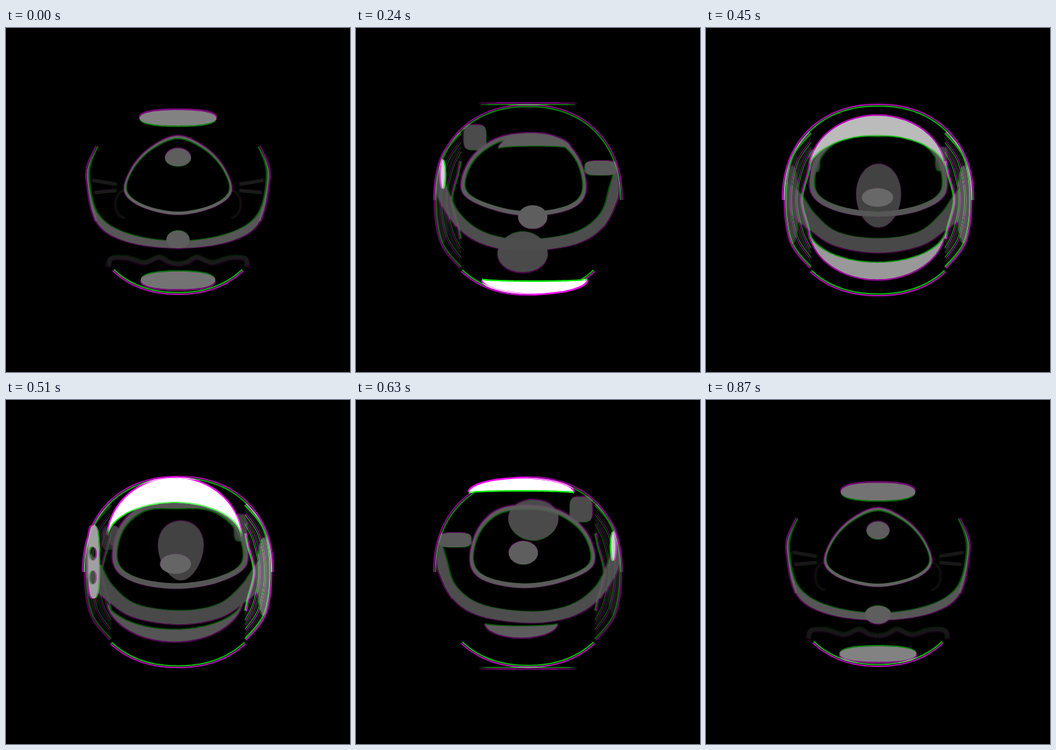
An HTML page with a canvas that plays this animation: 500 px wide and 500 px high, repeating every 900 ms.

```html
<!DOCTYPE html>
<html lang="en">
<head>
<meta charset="utf-8">
<title>Glass body</title>
<style>
html, body { margin: 0; width: 100%; height: 100%; overflow: hidden; background: #000; }
canvas { display: block; width: 500px; height: 500px; }
</style>
</head>
<body>
<canvas id="stage" width="500" height="500"></canvas>
<script>
const ctx = document.getElementById('stage').getContext('2d');
const LOOP = 900, STEP = 30, TURN = 870, MID = 250;
const { PI, sin, cos, abs, sign, max, min, floor } = Math;

// Coordinates are relative to the middle of the stage.
// Rows run down the right half: x, y facing front, x, y at the half turn, sideways swing.
const RING = [
  [0, -95, 0, -102, 4], [40, -78, 54, -99, 0], [68, -48, 92, -65, -5],
  [79, -12, 100, -12, -6], [52, 11, 64, 15, 4], [0, 22, 0, 25, 5],
];
const BOWL_OUTER = [
  [119, -79, 136, -25, 0], [134, -38, 132, 15, 0], [121, 31, 100, 44, 3],
  [77, 61, 62, 68, 2], [0, 71, 0, 78, -6],
];
const BOWL_INNER = [
  [119, -78, 134, -28, 0], [130, -38, 112, -8, 0], [117, 20, 92, 20, 3],
  [73, 49, 58, 47, 2], [0, 60, 0, 56, -6],
];
// Light pooling at the floor: time, half width, y, outer depth, inner depth, level.
const LENS = [
  [120, 100, 105, 32, 30, 0], [240, 78, 116, 22, 3, 255], [360, 99, 48, 91, 54, 255],
  [510, 102, 35, 68, 49, 85], [630, 54, 75, 22, 4, 92], [750, 28, 73, 14, -3, 92],
  [900, 17, 59, 15, -15, 95],
];
// Side reflections: time, x, y, half width, half height, level.
const UPPER_PATCH = [
  [60, -105, -85, 8, 20, 0], [120, -100, -82, 10, 26, 32], [240, -78, -92, 17, 19, 75],
  [360, -92, -65, 10, 20, 65], [510, -94, -53, 7, 15, 65], [600, -94, -45, 6, 12, 0],
];
const SIDE_PATCH = [
  [500, -102, -50, 8, 18, 40], [630, -107, -47, 24, 11, 88], [750, -115, -59, 12, 19, 75],
  [840, -120, -45, 12, 5, 0],
];

const mix = (a, b, k) => a + (b - a) * k;
const bump = (t, center, reach) => cos(PI / 2 * min(1, abs(t - center) / reach)) ** 2;
const rest = t => sin(PI * t / TURN) ** 2;
const swing = t => sin(2 * PI * t / TURN);

function sample(keys, t) {
  const i = keys.findIndex((key, n) => n && t >= keys[n - 1][0] && t < key[0]);
  if (i < 0) return null;
  const [a, b] = [keys[i - 1], keys[i]];
  return a.map((v, n) => mix(v, b[n], (t - a[0]) / (b[0] - a[0]))).slice(1);
}

// Smooth curve through the points.
function curve(pts, closed = false, path = new Path2D(), join = false) {
  const n = pts.length;
  const at = i => pts[closed ? (i + n) % n : max(0, min(n - 1, i))];
  path[join ? 'lineTo' : 'moveTo'](...at(0));
  for (let i = 0; i < (closed ? n : n - 1); i++) {
    const [p, a, b, q] = [at(i - 1), at(i), at(i + 1), at(i + 2)];
    path.bezierCurveTo(a[0] + (b[0] - p[0]) / 6, a[1] + (b[1] - p[1]) / 6,
      b[0] - (q[0] - a[0]) / 6, b[1] - (q[1] - a[1]) / 6, b[0], b[1]);
  }
  if (closed) path.closePath();
  return path;
}

function superArc(cx, cy, rx, ry, power = 2, from = 0, to = 2 * PI, taper = 0) {
  const bend = v => sign(v) * abs(v) ** (2 / power);
  return Array.from({ length: 49 }, (_, i) => {
    const a = mix(from, to, i / 48), y = bend(sin(a));
    return [cx + rx * bend(cos(a)) * (1 + taper * y), cy + ry * y];
  });
}

const oval = (...args) => curve(superArc(...args));

function lens(cx, halfWidth, y, outer, inner) {
  const path = curve(superArc(cx, y, halfWidth, outer, 2, 0, PI));
  return curve(superArc(cx, y, halfWidth, inner, 2, PI, 0).map(([x, py]) => [x, py]), false, path, true);
}

let flip = [1, 1];

// Red and blue refract a little wider than green; the brightest layer wins.
function paint(path, level, width = 0) {
  const v = floor(level);
  if (v < 1) return;
  for (const [scale, color] of [[1, `rgb(${v},0,${v})`], [0.982, `rgb(0,${v},0)`]]) {
    ctx.setTransform(scale * flip[0], 0, 0, scale * flip[1], MID, MID);
    ctx.fillStyle = ctx.strokeStyle = color;
    ctx.lineWidth = width;
    if (width) ctx.stroke(path);
    else ctx.fill(path, 'evenodd');
  }
}

function flipped(sx, sy, drawPart) {
  flip = [sx, sy];
  drawPart();
  flip = [1, 1];
}

function halves(rows, t) {
  const k = rest(t), s = swing(t);
  const half = side => rows.map(([x0, y0, x1, y1, shift]) =>
    [side * mix(x0, x1, k) + shift * s, mix(y0, y1, k)]);
  return [half(-1), half(1)];
}

function ring(t) {
  const [left, right] = halves(RING, t), k = rest(t);
  const outer = [...right, ...left.slice(1, -1).reverse()];
  const inner = outer.map(([x, y]) => [x * mix(0.95, 0.92, k), -36 + (y + 36) * mix(0.915, 0.86, k)]);
  paint(curve(inner, true, curve(outer, true)), 98 - 12 * k);
}

function bowl(t) {
  const sweep = rows => {
    const [left, right] = halves(rows, t);
    return [...left, ...right.reverse().slice(1)];
  };
  const outer = sweep(BOWL_OUTER);
  paint(curve(sweep(BOWL_INNER).reverse(), false, curve(outer), true), 86 - 14 * rest(t));
  const rim = 110 - 50 * rest(t);
  paint(curve(outer.slice(0, 3)), rim, 2);
  paint(curve(outer.slice(-3)), rim, 2);
}

function pool(t) {
  const key = sample(LENS, t);
  if (key) paint(lens(10 * swing(t), ...key.slice(0, 4)), key[4]);
}

function largeSpot(u) {
  const inside = max(0, min(TURN, u)), beyond = abs(u - inside);
  if (beyond > 270) return;
  const c = cos(PI * inside / TURN), s2 = rest(inside);
  const y = c * (118 + 0.085 * beyond);
  const rx = 33 + 22 * c ** 4 + 0.06 * beyond;
  const ry = (14 + 33 * s2 ** 1.3) * (1 - beyond / 280);
  const taper = (TURN / 2 - u) / 300 * s2 ** 4;
  const level = 66 + 49 * c ** 4 + beyond / 2;
  paint(oval(-8 * swing(inside), y, rx, ry, 2 + 0.4 * c ** 8, 0, 2 * PI, taper), level);
}

function smallSpot(t) {
  const rx = 17 + 6 * sin(PI * t / TURN), ry = 15.5 - 2 * cos(4 * PI * t / TURN);
  paint(oval(7 * swing(t), 58 - 0.137 * t, rx, ry), 93 + 12 * rest(t) ** 4);
}

// Nested reflections curling down one side of the body.
function stripes(level) {
  for (let i = 0; i < 7; i++) {
    const x = -136 + 4 * i, end = 99 - 7 * i, bulge = 62 - 4 * i;
    const pts = [[-99, -end], [x + 9, -bulge], [x, 0], [x + 9, bulge], [-99, end]];
    paint(curve(pts), level * (i % 2 ? 0.35 : 1), i % 3 ? 1.2 : 2.4);
  }
}

function leftSide(t) {
  const glow = bump(t, 370, 260);
  stripes(190 * glow);
  paint(oval(-126, 7, 10, 58), 105 * glow ** 2);
  paint(oval(-125, -38, 4, 22), 210 * bump(t, 240, 90));
  for (const keys of [UPPER_PATCH, SIDE_PATCH]) {
    const key = sample(keys, t);
    if (key) paint(oval(...key.slice(0, 4), 3.5), key[4]);
  }
  const column = oval(-124, -15, 9, 54, 3);
  for (const y of [-27, 8]) column.addPath(oval(-125, y, 5, 10));
  paint(column, 160 * bump(t, 510, 80));
}

function faint(t) {
  const level = 26 * max(bump(t, 0, 100), bump(t, LOOP, 150));
  const fins = [[[-126, -29], [-90, -23]], [[-123, -11], [-90, -14]]];
  const leg = [[-102, 98], [-98, 86], [-75, 85], [-50, 92], [-28, 84], [-14, 91], [0, 94]];
  for (const side of [-1, 1]) {
    flipped(side, 1, () => {
      fins.forEach(fin => paint(curve(fin), level, 5));
      paint(curve(leg), level, 7);
      paint(oval(-78, 6, 14, 20, 2, PI / 2, 3 * PI / 2), level * 0.7, 3);
    });
  }
}

function silhouette(t) {
  const k = rest(t), rx = 134 + 5 * k, ry = 137 + 2 * k;
  paint(oval(0, 0, rx, ry, 2.2, 0.26 * PI, 0.74 * PI), 185, 2);
  paint(oval(0, 0, rx, ry, 2.2, PI, 2 * PI), 180 * sin(PI * t / TURN), 2);
}

function draw(now) {
  const t = floor((now % LOOP) / STEP) * STEP;
  ctx.setTransform(1, 0, 0, 1, 0, 0);
  ctx.globalCompositeOperation = 'source-over';
  ctx.fillStyle = '#000';
  ctx.fillRect(0, 0, 500, 500);
  ctx.globalCompositeOperation = 'lighten';

  faint(t);
  ring(t);
  bowl(t);
  for (const u of [t - LOOP, t, t + LOOP]) largeSpot(u);
  smallSpot(t);

  // The second half of the turn mirrors the first.
  pool(t);
  flipped(-1, -1, () => pool(TURN - t));
  paint(lens(0, 100, -35, -78, -67), 255 * bump(t, 360, 80));
  leftSide(t);
  flipped(-1, 1, () => leftSide(TURN - t));
  silhouette(t);
}

function tick() {
  draw(performance.now());
  requestAnimationFrame(tick);
}
tick();
</script>
</body>
</html>
```
